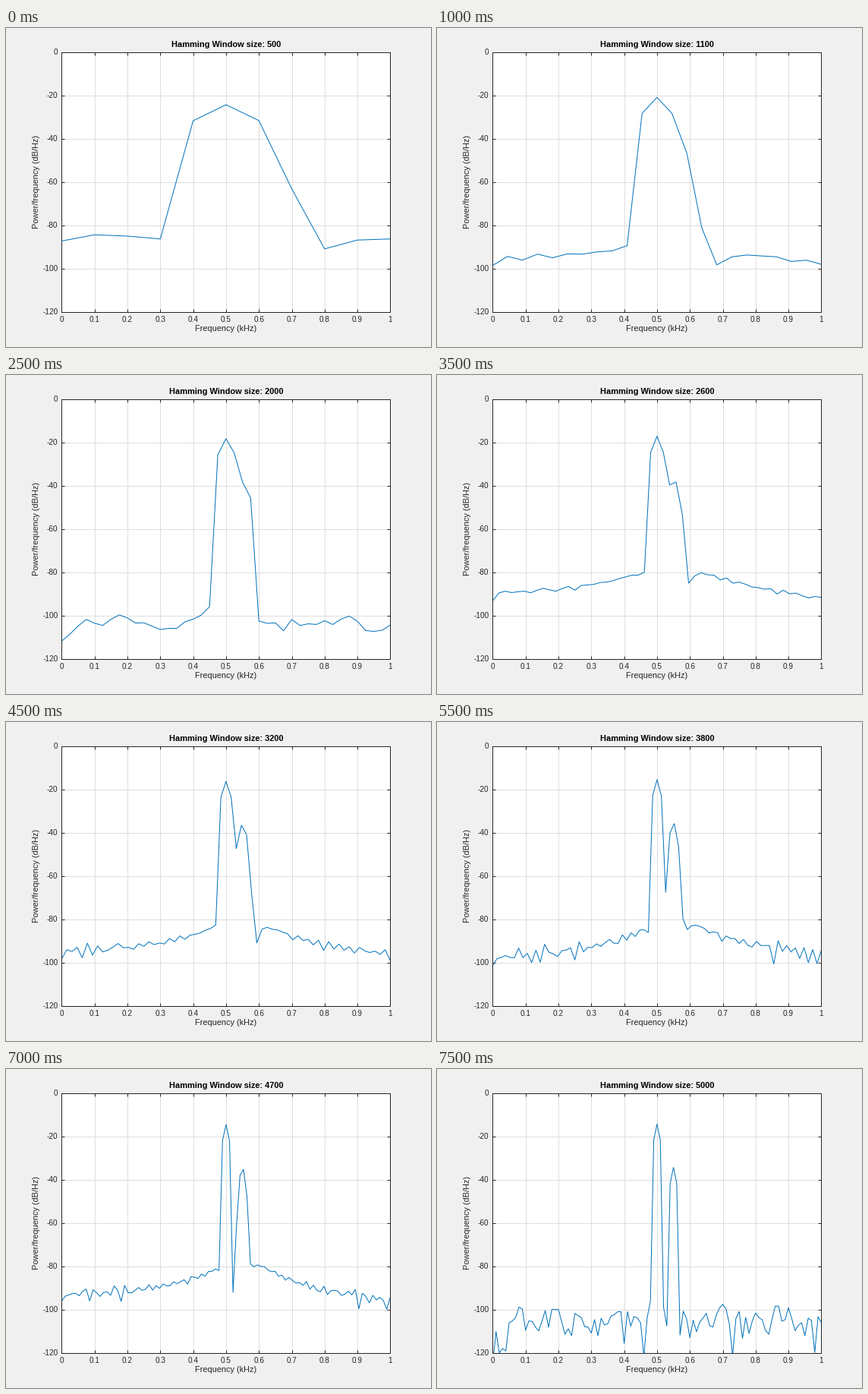
Write a matplotlib script that moves like this. It is 560 px wide and 420 px high and loops after 8 s.

```python
import numpy as np
import matplotlib.pyplot as plt
from matplotlib.animation import FuncAnimation

W, H, DPI = 560, 420, 70
PX = 72 / DPI                                  # one pixel in points
LEFT, RIGHT, TOP, BOTTOM = 73.4, 506.4, 31.6, 373.6
INK = (0.15, 0.15, 0.15)
plt.rcParams["font.family"] = "Liberation Sans"

FS, SAMPLES = 50_000, 5_000
SIZES = range(500, 5001, 300)


def make_signal():
    """A 500 Hz tone, a weaker 550 Hz tone and faint white noise."""
    t = np.arange(SAMPLES) / FS
    noise = 1e-3 * np.random.default_rng(7).standard_normal(SAMPLES)
    return np.sin(2 * np.pi * 500 * t) + 0.1 * np.sin(2 * np.pi * 550 * t) + noise


def welch_db(signal, size):
    """One-sided Welch estimate with 50% overlap, up to 1 kHz."""
    window = np.hamming(size)
    bins = 1000 * size // FS + 1
    starts = range(0, SAMPLES - size + 1, size // 2)
    power = np.mean([np.abs(np.fft.rfft(signal[s:s + size] * window)[:bins]) ** 2
                     for s in starts], axis=0)
    power *= 2 / (FS * np.sum(window ** 2))
    power[0] /= 2
    return np.arange(bins) * FS / size / 1000, 10 * np.log10(power)


signal = make_signal()
spectra = [welch_db(signal, size) for size in SIZES]

fig = plt.figure(figsize=(W / DPI, H / DPI), dpi=DPI, facecolor=(0.94,) * 3)
ax = fig.add_axes([LEFT / W, 1 - BOTTOM / H, (RIGHT - LEFT) / W, (BOTTOM - TOP) / H])
ax.set(xlim=(0, 1), ylim=(-120, 0),
       xticks=np.arange(11) / 10, yticks=range(-120, 1, 20))
ax.set_axisbelow(True)
ax.grid(color=(0.87,) * 3, linewidth=PX)
ax.tick_params(direction="in", length=4.5 * PX, width=PX, color=INK, top=True,
               right=True, labelbottom=False, labelleft=False)
for spine in ax.spines.values():
    spine.set(color=INK, linewidth=PX)


def label(x, y, text, size=10, ha="center", color=INK, **style):
    return fig.text(x / W, 1 - y / H, text, fontsize=size * PX, ha=ha,
                    va="baseline", color=color, **style)


for i in range(11):
    label(LEFT + (RIGHT - LEFT) * i / 10, 386.6, f"{i / 10:g}")
for db in range(-120, 1, 20):
    label(68.5, TOP - (BOTTOM - TOP) * db / 120 + 3.4, str(db), ha="right")
label(290, 399, "Frequency (kHz)", 11)
label(43, 202.5, "Power/frequency (dB/Hz)", 11, rotation=90, rotation_mode="anchor")
title = label(290, 25, "", 11, color="black", weight="bold")
curve, = ax.plot([], [], color="#0072BD", linewidth=PX)


def update(frame):
    curve.set_data(*spectra[frame])
    title.set_text(f"Hamming Window size: {SIZES[frame]}")
    return curve, title


anim = FuncAnimation(fig, update, frames=len(SIZES), interval=500, repeat=True)
plt.show()
```
